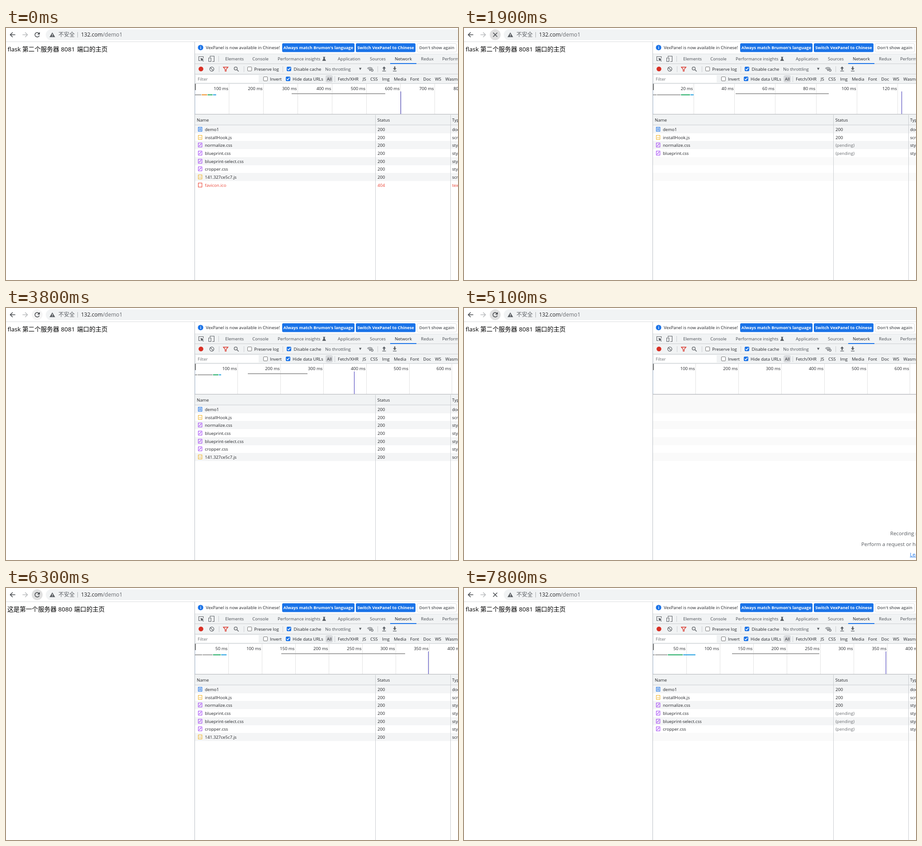
Recreate the animation shown at these times as an HTML page with a canvas. Size 1000x560 px, loop 8 s.

```html
<!DOCTYPE html>
<html lang="zh-CN">
<head>
<meta charset="utf-8">
<title>Network panel</title>
<style>
html, body { margin: 0; width: 100%; height: 100%; overflow: hidden; background: #fff; }
canvas { display: block; width: 100vw; height: 100vh; }
</style>
</head>
<body>
<canvas id="stage"></canvas>
<script>
const W = 1000, H = 560, LOOP = 8000;
const canvas = document.getElementById('stage');
const ctx = canvas.getContext('2d');
const dpr = window.devicePixelRatio || 1;
canvas.width = W * dpr;
canvas.height = H * dpr;

const LATIN = '"Open Sans", "Noto Sans", sans-serif';
const CJK = '"Noto Sans CJK SC", "Noto Sans CJK", sans-serif';
const INK = '#222428', ICON = '#5a5e63', EDGE = '#cacdd1', BAR = '#f1f3f4';
const BLUE = '#1a73e8', RED = '#d93025', GRAY = '#9e9e9e', GREEN = '#14a85c', SKY = '#199ce0';

const FILES = [
  ['demo1', 'document', 'doc'], ['installHook.js', 'script', 'js'],
  ['normalize.css', 'stylesheet', 'css'], ['blueprint.css', 'stylesheet', 'css'],
  ['blueprint-select.css', 'stylesheet', 'css'], ['cropper.css', 'stylesheet', 'css'],
  ['141.327ce5c7.js', 'script', 'js'], ['favicon.ico', 'text/html', 'missing']
];

// Overview scales: tick step, tick gap, bar ends with colours, load span, event line.
const SCALES = {
  first: { step: 100, gap: 75.8, bars: [[432, GRAY], [445, '#ee8a1d'], [457, GREEN], [465, SKY]], span: [632, 839], mark: 873 },
  quick: { step: 20, gap: 90.3, bars: [[426, GRAY], [479, GRAY], [500, GREEN], [508, SKY]], span: [601, 807], mark: 968 },
  full: { step: 100, gap: 94.8, bars: [[423, GRAY], [457, GRAY], [470, GREEN], [476, SKY]], span: [535, 667], mark: 770 },
  half: { step: 50, gap: 74.1, bars: [[434, GRAY], [457, GRAY], [475, GREEN], [488, SKY]], span: [609, 883], mark: 934 },
  late: { step: 50, gap: 74.1, bars: [[422, GRAY], [450, GRAY], [484, GREEN], [512, SKY]], span: [593, 786], mark: 933 },
  start: { step: 5, gap: 55.1 },
  idle: { step: 100, gap: 94.8 },
  idleHalf: { step: 50, gap: 74.1 }
};

// start time, rows, finished rows, scale, reload icon, hover strength, server
const STEPS = [
  [0, 8, 8, 'first', 'reload', 0, 2],
  [1300, 0, 0, 'first', 'reload', 0, 2],
  [1400, 1, 0, 'start', 'reload', 0, 2],
  [1600, 1, 1, 'start', 'stop', 0, 2],
  [1700, 2, 1, 'start', 'stop', 0, 2],
  [1900, 4, 2, 'quick', 'stop', .12, 2],
  [2000, 6, 2, 'quick', 'stop', .12, 2],
  [2100, 6, 4, 'quick', 'stop', .08, 2],
  [2200, 7, 5, 'full', 'stop', .04, 2],
  [2300, 7, 6, 'full', 'stop', 0, 2],
  [2400, 7, 7, 'full', 'stop', 0, 2],
  [2500, 7, 7, 'full', 'done', 0, 2],
  [3600, 7, 7, 'full', 'reload', 0, 2],
  [3800, 7, 7, 'full', 'reload', .04, 2],
  [4200, 7, 7, 'full', 'reload', .09, 2],
  [4800, 7, 7, 'full', 'reload', .12, 2],
  [5100, 0, 0, 'idle', 'reload', .12, 2],
  [5200, 1, 0, 'start', 'reload', .12, 2],
  [5400, 1, 1, 'start', 'stop', .12, 1],
  [5500, 2, 1, 'start', 'stop', .12, 1],
  [5700, 6, 2, 'half', 'stop', .12, 1],
  [6000, 7, 4, 'half', 'stop', .12, 1],
  [6100, 7, 7, 'half', 'stop', .12, 1],
  [6200, 7, 7, 'half', 'done', .12, 1],
  [6300, 7, 7, 'half', 'reload', .12, 1],
  [6700, 7, 7, 'half', 'reload', .13, 1],
  [6900, 0, 0, 'idleHalf', 'reload', .13, 1],
  [7000, 1, 0, 'start', 'reload', .13, 1],
  [7300, 1, 1, 'start', 'stop', .13, 2],
  [7400, 2, 1, 'start', 'stop', .13, 2],
  [7600, 6, 2, 'late', 'stop', 0, 2],
  [7800, 6, 3, 'late', 'stop', 0, 2]
];

function rect(x, y, w, h, color) {
  ctx.fillStyle = color;
  ctx.fillRect(x, y, w, h);
}

function box(x, y, w, h, r, fill, stroke) {
  ctx.beginPath();
  ctx.roundRect(x, y, w, h, r);
  if (fill) { ctx.fillStyle = fill; ctx.fill(); }
  if (stroke) { ctx.strokeStyle = stroke; ctx.lineWidth = 1; ctx.stroke(); }
}

function disc(x, y, r, color) {
  ctx.beginPath();
  ctx.arc(x, y, r, 0, Math.PI * 2);
  ctx.fillStyle = color;
  ctx.fill();
}

function ring(x, y, r, color, width = 1.2, from = 0, to = Math.PI * 2) {
  ctx.beginPath();
  ctx.arc(x, y, r, from, to);
  ctx.strokeStyle = color;
  ctx.lineWidth = width;
  ctx.stroke();
}

function path(d, color, width = 1.2) {
  ctx.strokeStyle = color;
  ctx.lineWidth = width;
  ctx.stroke(new Path2D(d));
}

function shape(d, color) {
  ctx.fillStyle = color;
  ctx.fill(new Path2D(d));
}

// y is the middle of the capitals; the baseline sits on a whole pixel
function text(s, x, y, { size = 9.55, color = INK, weight = 400, align = 'left', font = LATIN } = {}) {
  ctx.font = `${weight} ${size}px ${font}`;
  ctx.textAlign = align;
  ctx.fillStyle = color;
  ctx.fillText(s, x, Math.round(y + size * .365));
  return ctx.measureText(s).width;
}

function checkbox(x, y, on) {
  box(x + .5, y + .5, 9, 9, 1.5, on ? BLUE : '#fff', on ? BLUE : '#767676');
  if (on) path(`M${x + 2} ${y + 5}l2.2 2.3l4-4.8`, '#fff', 1.5);
}

function divider(x, y, h = 13) {
  rect(x, y, 1, h, EDGE);
}

function reloadIcon(kind, hover) {
  if (hover) disc(69, 15, 12, `rgba(0,0,0,${hover})`);
  if (kind === 'reload') {
    ring(69, 15, 4.9, '#45484c', 1.6, .35, Math.PI * 1.78);
    shape('M74.8 9v5.6h-5.6z', '#45484c');
  } else {
    path('M64.5 10.5l9 9M73.5 10.5l-9 9', kind === 'stop' ? '#45484c' : '#babcbe', 1.5);
  }
}

function addressBar(icon, hover) {
  rect(0, 30, W, 1, '#d9dbde');
  path('M20.5 15H9.5M14.7 9.7L9.4 15l5.3 5.3', '#45484c', 1.6);
  path('M36.5 15h11M42.3 9.7l5.3 5.3l-5.3 5.3', '#babcbe', 1.6);
  reloadIcon(icon, hover);
  box(88, 3, 940, 24, 12, BAR);
  shape('M102.5 9.8l6.2 10.5H96.3z', ICON);
  rect(102, 13.2, 1.2, 3.6, '#fff');
  rect(102, 17.7, 1.2, 1.2, '#fff');
  text('不安全', 116, 15, { size: 12, color: ICON, font: CJK });
  rect(158, 9, 1, 12, '#a9acb0');
  const host = text('132.com', 166, 15, { size: 12, color: '#202124' });
  text('/demo1', 166 + host, 15, { size: 12, color: '#66696e' });
}

function page(server) {
  const latin = { size: 13.5, color: '#000' };
  const han = { size: 13.6, color: '#000', font: CJK };
  if (server === 2) {
    text('flask', 3.5, 47, latin);
    text('第二个服务器', 36, 47, han);
    text('8081', 121.5, 47, latin);
    text('端口的主页', 157, 47, han);
  } else {
    text('这是第一个服务器', 3, 47, han);
    text('8080', 115.5, 47, latin);
    text('端口的主页', 150.5, 47, han);
  }
}

function infoBar() {
  disc(430.5, 43.5, 6, BLUE);
  rect(430, 42.5, 1.3, 4, '#fff');
  rect(430, 40, 1.3, 1.4, '#fff');
  text('VexPanel is now available in Chinese!', 442, 44);
  const label = { size: 9.2, weight: 700, color: '#fff', align: 'center' };
  box(611, 34, 160, 19.5, 2.5, BLUE);
  text("Always match Brumon's language", 691, 44, label);
  box(774, 34, 132, 19.5, 2.5, BLUE);
  text('Switch VexPanel to Chinese', 840, 44, label);
  box(909.5, 34.5, 87, 19, 2.5, '#fff', '#dadce0');
  text("Don't show again", 953, 44, { size: 9.4, weight: 600, color: '#54585c', align: 'center' });
}

function tabBar() {
  rect(418, 57, 582, 23, BAR);
  rect(418, 57, 582, 1, '#dfe1e4');
  rect(418, 79, 582, 1, EDGE);
  path('M436.5 67v-3.5h-10v9h3.5', ICON, 1.1);
  shape('M430.5 66.5l7 2.8l-2.7 1.2l2.5 3l-1.2 1l-2.5-3l-1.7 2.4z', ICON);
  path('M451.5 65v-2.5h9v12h-4M448.5 66.5h5v8h-5z', ICON, 1.1);
  divider(470, 62);
  const tabs = { Elements: 485, Console: 545, 'Performance insights': 601, Application: 734, Sources: 805, Network: 860, Redux: 918, Performance: 965 };
  for (const name in tabs) text(name, tabs[name], 69, { color: name === 'Network' ? INK : '#484c52' });
  shape('M701.3 64h5v1h-1v3l2.7 5h-8.4l2.7-5v-3h-1z', ICON);
  rect(850, 78, 58, 2, BLUE);
}

function toolBar() {
  rect(418, 80, 582, 23, BAR);
  rect(418, 102, 582, 1, EDGE);
  disc(431.3, 91, 5.3, RED);
  ring(455.3, 91.3, 4.6, ICON, 1.3);
  path('M452 88l6.6 6.6', ICON, 1.3);
  for (const x of [471, 526, 612, 822]) divider(x, 85);
  path('M480.8 87h10.4l-4 4.8v4h-2.4v-4z', RED, 1.3);
  ring(508.2, 90, 3.4, ICON, 1.3);
  path('M510.7 92.5l4 4', ICON, 1.5);
  checkbox(534, 86, false);
  text('Preserve log', 549, 91.5);
  checkbox(621, 86, true);
  text('Disable cache', 636.5, 91.5);
  text('No throttling', 706, 91.5, { color: '#484c52' });
  shape('M781 88.5h5.6l-2.8 5z', ICON);
  for (const r of [2.5, 5, 7.5]) ring(805, 95, r, ICON, 1.2, Math.PI * 1.23, Math.PI * 1.77);
  disc(805, 94.5, 1, ICON);
  ring(810, 94, 2.2, ICON, 1.2);
  shape('M836.5 85.5l4 4.3h-2.7v4h-2.6v-4h-2.7zM832.5 95h8v1.3h-8z', ICON);
  shape('M860 93.8l-4-4.3h2.7v-4h2.6v4h2.7zM856 95h8v1.3h-8z', ICON);
}

function filterBar() {
  rect(418, 103, 582, 21, BAR);
  rect(418, 123, 582, 1, EDGE);
  rect(421, 105, 138, 16, '#fff');
  text('Filter', 424, 114, { color: '#6e7276' });
  checkbox(569, 108, false);
  text('Invert', 584, 113.5);
  checkbox(619, 108, true);
  text('Hide data URLs', 634, 113.5);
  box(707, 105, 16, 16, 4, '#d9dbde');
  divider(727, 107);
  const kinds = { All: 710, 'Fetch/XHR': 734, JS: 789, CSS: 806, Img: 832, Media: 858, Font: 894, Doc: 923, WS: 949, Wasm: 972 };
  for (const name in kinds) text(name, kinds[name], 113.5);
}

function overview({ step, gap, bars, span, mark }, empty) {
  for (let i = 1; i < 13; i++) {
    const x = 418 + i * gap;
    rect(Math.floor(x), 124, 1, 67, '#e2e2e2');
    text(`${i * step} ms`, x - 2, 134.5, { align: 'right' });
  }
  rect(418, 138, 1, 53, '#d4e2f4');
  rect(418, 124, 2, 14, '#777');
  rect(418, 191, 582, 1.5, '#b9bcc0');
  if (!bars || empty) return;
  let x = 418;
  for (const [end, color] of bars) {
    rect(x, 147.5, end - x, 2, color);
    x = end + 1;
  }
  rect(span[0], 145, span[1] - span[0], 2, '#a3a3a3');
  rect(mark, 141, 1, 50, '#392fb5');
}

function fileIcon(kind, y) {
  const color = { doc: BLUE, js: '#f0b429', css: '#a142f4', missing: '#ea4335' }[kind];
  ctx.strokeStyle = color;
  ctx.lineWidth = 1.1;
  ctx.strokeRect(425.5, y - 4.5, 8, 9);
  if (kind === 'doc') path(`M427 ${y - 2}h5M427 ${y}h5M427 ${y + 2}h5`, color, 1);
  if (kind === 'js') path(`M429 ${y - 1}l-1.5 1.5l1.5 1.5M430 ${y - 1}l1.5 1.5l-1.5 1.5`, color, 1);
  if (kind === 'css') path(`M427.5 ${y + 2.3}l4-4.6`, color, 1.3);
}

function emptyNote() {
  rect(418, 193, 582, 41, '#f9f9f9');
  const style = { size: 11.3, color: '#54585d' };
  text('Recording network activity…', 943, 501, style);
  text('Perform a request or hit F5 to record the reload.', 879, 525, style);
  const w = text('Learn more', 986.5, 548, { size: 11.3, color: BLUE });
  rect(986.5, 553, w, 1, BLUE);
}

function table(rows, done, reloaded) {
  const pitch = 17.68;
  for (let i = 0; i < 8; i += 2) {
    const y = Math.round(216 + i * pitch);
    if (i < rows) rect(418, y, 582, 18, '#f4f5f6');
    else if (reloaded) rect(418, y, 582, 18, '#fafafa');
  }
  if (!rows) return emptyNote();
  rect(418, 192.5, 582, 23, BAR);
  rect(418, 215, 582, 1, EDGE);
  text('Name', 422, 204.5);
  text('Status', 821.5, 204.5);
  text('Type', 987, 204.5);
  for (let i = 0; i < rows; i++) {
    const [name, type, kind] = FILES[i];
    const y = 225.5 + i * pitch, missing = kind === 'missing';
    const color = missing ? '#ea4335' : INK;
    fileIcon(kind, Math.round(y - .5));
    text(name, 440, y, { color });
    if (i < done) text(missing ? '404' : '200', 822, y, { color });
    else text('(pending)', 822, y, { color: '#6a6d71' });
    text(type, 987, y, { color });
  }
  rect(817, 193, 1, 367, EDGE);
  rect(983, 193, 1, 367, EDGE);
}

function draw(time) {
  const step = STEPS.findLast(s => s[0] <= time);
  const [start, rows, done, scale, icon, hover, server] = step;
  ctx.setTransform(dpr, 0, 0, dpr, 0, 0);
  rect(0, 0, W, H, '#fff');
  addressBar(icon, hover);
  page(server);
  infoBar();
  tabBar();
  toolBar();
  filterBar();
  overview(SCALES[scale], !rows);
  table(rows, done, start > 0);
  rect(417, 31, 1, 529, '#b9bec5');
}

const origin = performance.now();
function tick() {
  draw((performance.now() - origin) % LOOP);
  requestAnimationFrame(tick);
}
tick();
</script>
</body>
</html>
```
